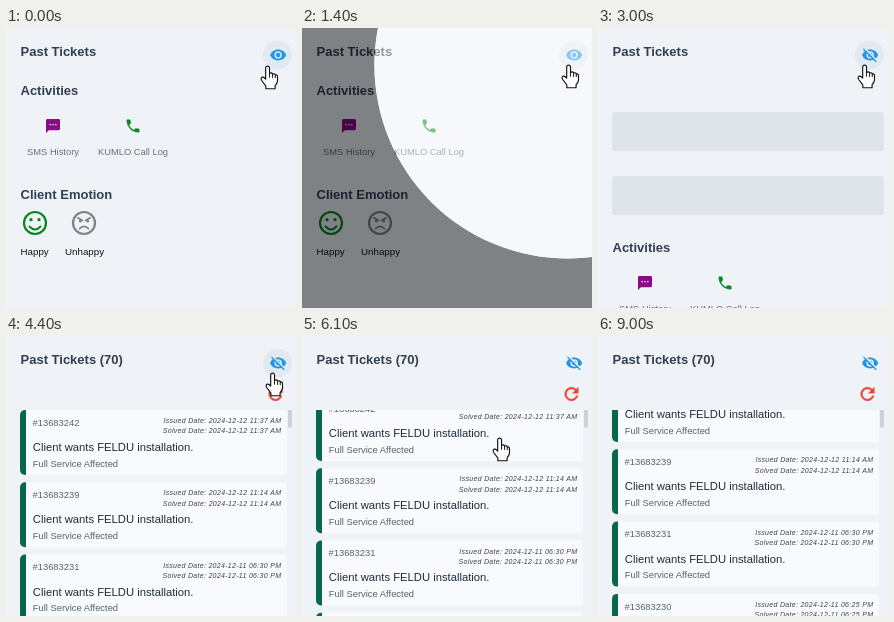
Write an HTML page that moves like this. It is 290 px wide and 280 px high and loops after 9.1 s.

```html
<!DOCTYPE html>
<html lang="en">
<head>
<meta charset="utf-8">
<title>Past Tickets</title>
<style>
  html, body { margin: 0; width: 100%; height: 100%; overflow: hidden; background: #eff3f8; }
  svg { display: block; width: 290px; height: 280px; font-family: "Liberation Sans", Arial, sans-serif; }
  .head { font-size: 13px; font-weight: bold; fill: #323f52; }
  .label { font-size: 9.35px; fill: #66707c; text-anchor: middle; }
  .mood { font-size: 9.75px; fill: #111; }
  .id, .sub { font-size: 9.38px; fill: #58626f; }
  .what { font-size: 11.25px; fill: #1f2b3a; }
  .date { font-size: 7px; font-style: italic; letter-spacing: .3px; fill: #3c4450; text-anchor: end; }
  .line { fill: none; stroke-linecap: round; stroke-linejoin: round; }
</style>
</head>
<body>
<svg viewBox="0 0 290 280">
  <defs>
    <clipPath id="listClip"><rect x="0" y="74" width="290" height="206"/></clipPath>
    <clipPath id="boneClip"><rect id="boneArea" x="0" y="40" width="290" height="0"/></clipPath>
    <mask id="slashCut">
      <rect width="24" height="24" fill="#fff"/>
      <path d="M3.6 2.2L22 20.6" stroke="#000" stroke-width="2.2"/>
    </mask>
  </defs>

  <rect width="290" height="280" fill="#eff3f8"/>
  <text id="title" class="head" x="14.5" y="28">Past Tickets</text>

  <g id="bones" clip-path="url(#boneClip)" fill="#dfe4ea">
    <rect x="14" y="84" width="272" height="39" rx="3"/>
    <rect x="14" y="148" width="272" height="39" rx="3"/>
  </g>

  <g id="lower">
    <text class="head" x="14.5" y="67">Activities</text>
    <path transform="translate(38.6 89.6) scale(.7)" fill="#8b0a86" d="M20 2H4c-1.1 0-2 .9-2 2v18l4-4h14c1.1 0 2-.9 2-2V4c0-1.1-.9-2-2-2zM9 11H7V9h2zm4 0h-2V9h2zm4 0h-2V9h2z"/>
    <path transform="translate(118.4 89.4) scale(.72)" fill="#078a22" d="M6.6 10.8c1.4 2.8 3.8 5.1 6.6 6.6l2.2-2.2c.3-.3.7-.4 1-.2 1.1.4 2.3.6 3.6.6.5 0 1 .4 1 1V20c0 .5-.5 1-1 1C10.6 21 3 13.4 3 4c0-.5.5-1 1-1h3.5c.6 0 1 .5 1 1 0 1.3.2 2.5.6 3.6.1.3 0 .7-.3 1z"/>
    <text class="label" x="47" y="127">SMS History</text>
    <text class="label" x="127" y="127">KUMLO Call Log</text>
    <text class="head" x="14.5" y="171">Client Emotion</text>
    <g class="line" stroke="#0a8420" stroke-width="2.2">
      <circle cx="29" cy="195" r="11"/>
      <path d="M23.5 198.5Q29 204.5 34.5 198.5" stroke-width="1.9"/>
      <path d="M25 191.7h.01M33 191.7h.01" stroke-width="3.3"/>
    </g>
    <g class="line" stroke="#808080" stroke-width="2.2">
      <circle cx="78" cy="195" r="11"/>
      <path d="M73.5 200.8Q78 195.8 82.5 200.8M71.8 189.8L76.5 192.4M84.2 189.8L79.5 192.4" stroke-width="1.7"/>
      <path d="M74.3 193.2h.01M81.7 193.2h.01" stroke-width="2.8"/>
    </g>
    <text class="mood" x="14.5" y="227">Happy</text>
    <text class="mood" x="59" y="227">Unhappy</text>
  </g>

  <g id="list">
    <path transform="translate(259.3 47.8) scale(.85)" fill="#f04438" stroke="#f04438" stroke-width=".5" d="M17.65 6.35A8 8 0 1 0 19.73 14h-2.08A6 6 0 1 1 16.22 7.78L13 11h7V4z"/>
    <g clip-path="url(#listClip)"><g id="cards"></g></g>
    <rect x="282" y="74" width="4" height="17.5" rx="1" fill="#cdd0d4"/>
  </g>

  <circle id="hover" cx="271.5" cy="27" r="14.5" fill="#e1e9f1"/>
  <g transform="translate(263.4 18.2) scale(.73)" fill="#2196ea">
    <path id="eye" fill-rule="evenodd" d="M12 4.5C7 4.5 2.7 7.6 1 12c1.7 4.4 6 7.5 11 7.5s9.3-3.1 11-7.5c-1.7-4.4-6-7.5-11-7.5zM12 7a5 5 0 0 1 0 10a5 5 0 0 1 0-10zM12 9a3 3 0 0 0 0 6a3 3 0 0 0 0-6z"/>
    <path id="slash" d="M2 4.3L3.3 3L21 20.7L19.7 22z"/>
  </g>

  <g id="spot">
    <path id="shade" fill-rule="evenodd"/>
    <circle id="glow" cx="266" cy="37" fill="#fff"/>
  </g>

  <g id="hand">
    <g transform="translate(-.4 -.8) scale(.96)">
      <path d="M-2 13V2a2 2 0 0 1 4 0V7.5Q4.5 6 5.2 8.3Q7.5 7 8 9.2Q10.3 8.6 10.3 11V15.5Q10 18 7.8 20.3V23.5H-1.8V20.8L-6.3 14.6Q-7.5 12.3-5.5 11.4Q-4 11-2 13.5z"
        fill="#fff" stroke="#111" stroke-width="1.2" stroke-linejoin="round"/>
      <path class="line" d="M2 7.5v4M5.2 8.5v3.3M8 9.5v2.5" stroke="#111"/>
    </g>
  </g>
</svg>

<script>
const LOOP = 9100, STEP = 100;
const $ = id => document.getElementById(id);
const set = (id, name, value) => $(id).setAttribute(name, value);
const show = (id, on) => set(id, 'visibility', on ? 'visible' : 'hidden');
const progress = (t, from, to) => Math.min(1, Math.max(0, (t - from) / (to - from)));
const smooth = p => p * p * (3 - 2 * p);

const tickets = [
  ['13683242', '2024-12-12 11:37 AM'],
  ['13683239', '2024-12-12 11:14 AM'],
  ['13683231', '2024-12-11 06:30 PM'],
  ['13683230', '2024-12-11 06:25 PM']
];
$('cards').innerHTML = tickets.map(([id, date], i) => `
  <g transform="translate(0 ${74 + i * 72.3})">
    <path d="M20 0H278a3 3 0 0 1 3 3V62a3 3 0 0 1-3 3H20z" fill="#f8fafd"/>
    <path d="M20 0H19a5 5 0 0 0-5 5V60a5 5 0 0 0 5 5H20z" fill="#08694a"/>
    <text class="id" x="26.5" y="15.7">#${id}</text>
    <text class="date" x="275.3" y="13.2">Issued Date: ${date}</text>
    <text class="date" x="275.3" y="23.4">Solved Date: ${date}</text>
    <text class="what" x="26.8" y="41">Client wants FELDU installation.</text>
    <text class="sub" x="26.8" y="56.8">Full Service Affected</text>
  </g>`).join('');

// Pointer waypoints: time, x, y
const route = [
  [0, 262, 39], [300, 267, 38], [4600, 267, 38], [4800, 180, 130], [5000, 30, 245],
  [5300, 120, 180], [5600, 198, 103], [7200, 198, 103], [7400, 170, 150],
  [7600, 110, 203], [7800, 52, 150], [8000, 90, 50], [8200, 150, 9],
  [8300, 200, 42], [8500, 268, 130], [8700, 150, 220], [8900, 25, 290], [LOOP, 25, 310]
];

function pointer(t) {
  const i = route.findIndex(p => p[0] > t);
  const [t0, x0, y0] = route[i - 1], [t1, x1, y1] = route[i];
  const p = smooth(progress(t, t0, t1));
  return [x0 + (x1 - x0) * p, y0 + (y1 - y0) * p];
}

function spotlight(t) {
  const far = t < 1200 ? 1 - progress(t, 300, 1000) : progress(t, 1300, 2000);
  const r = 100 + 655 * far;
  set('spot', 'opacity', 0.54 * (1 - far));
  set('glow', 'r', r);
  set('shade', 'd', `M0 0H290V280H0zM${266 - r} 37a${r} ${r} 0 0 1 ${2 * r} 0a${r} ${r} 0 0 1 ${-2 * r} 0z`);
}

function draw(t) {
  const [x, y] = pointer(t);
  set('hand', 'transform', `translate(${x} ${y})`);
  show('hover', Math.hypot(x - 271.5, y - 27) < 15.6);
  spotlight(t);

  const open = t >= 2400, loaded = t >= 3700;
  const drop = 157 * smooth(progress(t, 2300, 2700));
  set('boneArea', 'height', drop);
  set('lower', 'transform', `translate(0 ${drop})`);
  show('bones', !loaded);
  show('lower', !loaded);
  show('list', loaded);
  show('slash', open);
  set('eye', 'mask', open ? 'url(#slashCut)' : 'none');
  $('title').textContent = loaded ? 'Past Tickets (70)' : 'Past Tickets';
  set('cards', 'transform', `translate(0 ${-33 * smooth(progress(t, 5820, 6440))})`);
}

const start = performance.now();
function tick() {
  const t = (performance.now() - start) % LOOP;
  draw(Math.floor(t / STEP) * STEP);
  requestAnimationFrame(tick);
}
tick();
</script>
</body>
</html>
```
